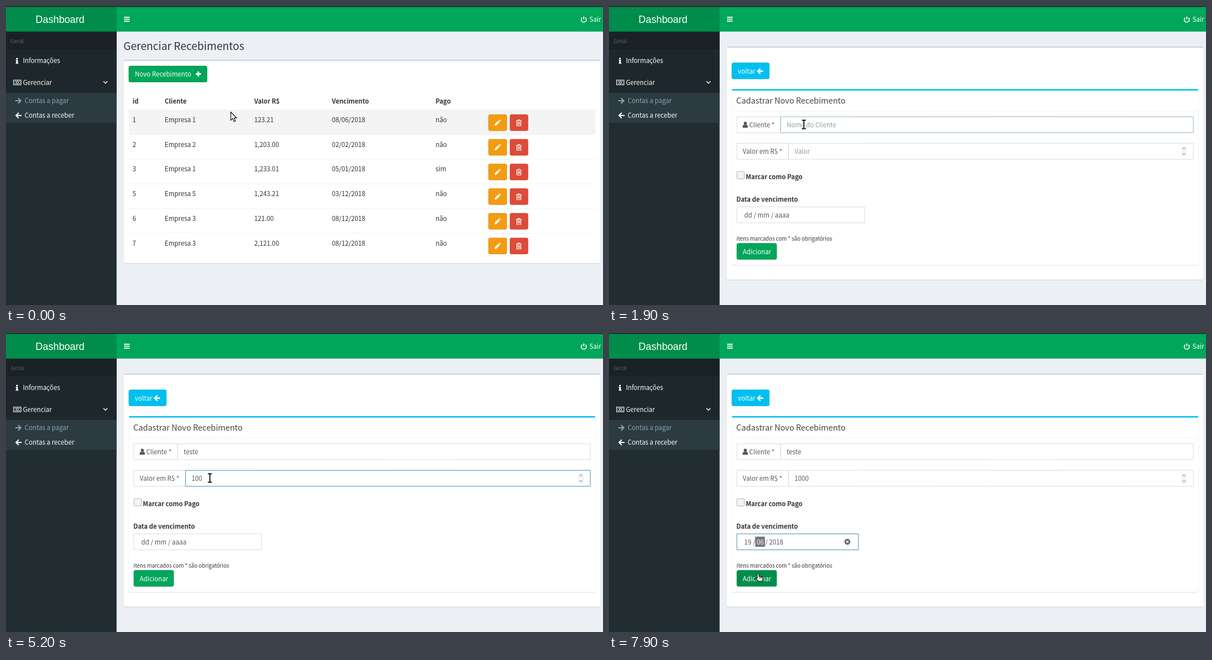
Animation, 1057 px wide and 530 px high, one loop 8 s. Source, as an HTML page with a canvas:

```html
<!DOCTYPE html>
<html lang="pt-BR">
<head>
<meta charset="utf-8">
<title>Dashboard</title>
<style>
html, body { margin: 0; width: 100%; height: 100%; overflow: hidden; background: #ecf0f5; }
canvas { display: block; }
</style>
</head>
<body>
<canvas id="stage" width="1057" height="530"></canvas>
<script>
const ctx = document.getElementById('stage').getContext('2d');
const LOOP = 8000, STEP = 100;
const PX = 6 / 7; // one page pixel on the scaled-down screen
const CONTROL = 34 * PX, SIDEBAR = 195.8, NAV_BOTTOM = 45.4;
const UI = '"Noto Sans CJK JP", "Noto Sans CJK SC", "Noto Sans CJK", sans-serif';
const SYSTEM = '"Noto Sans", sans-serif';
const GREEN = '#00a65a', DARK_GREEN = '#008d4c', CYAN = '#00c0ef', LINE = '#d2d6de', BLUE = '#3c8dbc';

const clamp = v => Math.max(0, Math.min(1, v));
const smooth = v => v * v * (3 - 2 * v);

function rect(x1, y1, x2, y2, color) {
  ctx.fillStyle = color;
  ctx.fillRect(x1, y1, x2 - x1, y2 - y1);
}

function frame(x1, y1, x2, y2, fill, border, radius = 0) {
  ctx.beginPath();
  ctx.roundRect(x1 + PX / 2, y1 + PX / 2, x2 - x1 - PX, y2 - y1 - PX, radius);
  if (fill) { ctx.fillStyle = fill; ctx.fill(); }
  ctx.lineWidth = PX;
  ctx.strokeStyle = border;
  ctx.stroke();
}

const button = (x1, y, x2, fill, border) => frame(x1, y, x2, y + CONTROL, fill, border, 2.5);

function text(str, x, y, color = '#333', size = 11.3, family = UI, weight = 400) {
  ctx.font = `${weight} ${size}px ${family}`;
  ctx.fillStyle = color;
  ctx.fillText(str, x, y);
}
const bold = (str, x, y) => text(str, x, y, '#333', 11.15, UI, 700);

function centered(str, x, y, ...style) {
  ctx.textAlign = 'center';
  text(str, x, y, ...style);
  ctx.textAlign = 'left';
}

function icon(d, x, y, { fill, stroke, width = 1, angle = 0, flip = 1 }) {
  const path = new Path2D(d);
  ctx.save();
  ctx.translate(x, y);
  ctx.rotate(angle);
  ctx.scale(flip, 1);
  if (fill) { ctx.fillStyle = fill; ctx.fill(path); }
  if (stroke) { ctx.strokeStyle = stroke; ctx.lineWidth = width; ctx.stroke(path); }
  ctx.restore();
}

const ARROW = 'M5.5 0H-4M.5-4.7L-4.2 0L.5 4.7';
const CHEVRON = 'M2-3.5L-1.5 0L2 3.5';
const PENCIL = 'M-5 5l.8-3.4 5.6-5.6 2.6 2.6-5.6 5.6zM2.2-4.8l1-1q.6-.4 1.1 0l1.5 1.5q.4.5 0 1.1l-1 1z';
const TRASH = 'M-5-3.5h10M-1.8-3.5v-1.7h3.6v1.7M-3.6-3.5v8.6h7.2v-8.6M-1.5-1.5v4.6M.2-1.5v4.6M1.8-1.5v4.6';
const USER = 'M-2.7-2.6a2.7 2.9 0 1 1 5.4 0a2.7 2.9 0 1 1-5.4 0zM-4.6 5.2q-.4-5 2.4-5.2q2.2 1.6 4.4 0q2.8.2 2.4 5.2z';
const POWER = 'M-2.7-3.3a4.5 4.5 0 1 0 5.4 0M0-5.5v5.3';
const POINTER = 'M0 0V14.5L3.4 11.4L5.7 16.8L8.2 15.7L5.9 10.5H10.4Z';
const HAND = 'M-1.5 1q1.5-2 3 0v4.5l6 1.2q1.5.5 1.2 2.3l-1 5h-7.5l-4.5-5.5q.5-1.8 2.8 0z';
const BEAM = 'M-3.5-7.5h2.5l1 1 1-1h2.5M-3.5 7.5h2.5l1-1 1 1h2.5M0-6.5v13';

// A raised panel with a coloured top edge.
function panel(x1, y1, x2, y2, edge) {
  ctx.save();
  ctx.shadowColor = 'rgba(0,0,0,.12)';
  ctx.shadowBlur = 1.5;
  ctx.shadowOffsetY = 1;
  ctx.fillStyle = '#fff';
  ctx.beginPath();
  ctx.roundRect(x1, y1, x2 - x1, y2 - y1, 2.5);
  ctx.fill();
  ctx.restore();
  rect(x1 + .7, y1, x2 - .7, y1 + 3 * PX, edge);
}

function drawShell(t, dx) {
  rect(0, 0, 1057, 530, '#ecf0f5');
  rect(0, 0, 1057, NAV_BOTTOM, GREEN);
  rect(0, 45, SIDEBAR, 530, '#222d32');
  rect(0, 45, SIDEBAR, 77, '#1a2226');
  rect(0, 77, SIDEBAR, 154, '#1e282c');
  rect(0, 154, SIDEBAR, 207, '#2c3b41');
  rect(0, 0, SIDEBAR, NAV_BOTTOM, DARK_GREEN);
  rect(0, 0, 1057, 1.7, '#222a2c');
  centered('Dashboard', 95.6, 30, '#fff', 17.7, '"Liberation Sans", Arial, sans-serif');
  for (const y of [19, 22.5, 26]) rect(209, y, 219, y + 1.8, '#fff');
  icon(POWER, 1023 + dx, 24, { stroke: '#fff', width: 1.6 });
  text('Sair', 1033 + dx, 28, '#fff');

  text('Geral', 8, 66, '#4b646f', 9.6);
  icon('M-1.5-5h3v2.4h-3zM-2.3-1.4h3.8v5h1v1.6h-4.8v-1.6h1v-3.4h-1z', 19.5, 97, { fill: '#fff' });
  text('Informações', 30, 101, '#fff');
  icon('M-6.5-4.3h13v8.6h-13zM-4.7-1.5q1.3-.3 1.5-1.5M4.7-1.5q-1.3-.3-1.5-1.5M-4.7 1.5q1.3.3 1.5 1.5M4.7 1.5q-1.3.3-1.5 1.5M-1.8 0a1.8 2.5 0 1 0 3.6 0a1.8 2.5 0 1 0-3.6 0',
    20, 135.5, { stroke: '#fff', width: 1.1 });
  text('Gerenciar', 30, 140, '#fff');
  const closed = t >= 1000 ? 1 - clamp((t - 1200) / 300) : 0;
  icon(CHEVRON, 176, 135.5, { stroke: '#fff', width: 1.3, angle: (closed - 1) * Math.PI / 2 });
  icon(ARROW, 22, 168, { stroke: '#8aa4af', width: 2, flip: -1 });
  text('Contas a pagar', 33, 172, '#8aa4af');
  icon(ARROW, 22, 194, { stroke: '#fff', width: 2 });
  text('Contas a receber', 33, 198, '#fff');
}

const COLUMNS = [224, 281, 439.5, 577, 760.5];
const ROWS = [
  ['1', 'Empresa 1', '123.21', '08/06/2018', 'não'],
  ['2', 'Empresa 2', '1,203.00', '02/02/2018', 'não'],
  ['3', 'Empresa 1', '1,233.01', '05/01/2018', 'sim'],
  ['5', 'Empresa 5', '1,243.21', '03/12/2018', 'não'],
  ['6', 'Empresa 3', '121.00', '08/12/2018', 'não'],
  ['7', 'Empresa 3', '2,121.00', '08/12/2018', 'não']
];

function drawList(mouse) {
  text('Gerenciar Recebimentos', 208, 78, '#333', 18.8);
  panel(208.5, 95, 1052.6, 456, LINE);
  button(217.2, 106, 356.3, mouse.y < 135 ? DARK_GREEN : GREEN, DARK_GREEN);
  text('Novo Recebimento', 228.3, 125, '#fff');
  rect(336, 119, 345, 122, '#fff');
  rect(339, 116, 342, 125, '#fff');

  ['id', 'Cliente', 'Valor R$', 'Vencimento', 'Pago'].forEach((name, i) => bold(name, COLUMNS[i], 173));
  ROWS.forEach((row, i) => {
    const y = i * 51 * PX, top = 184 + y, buttons = 192.2 + y;
    if (!i && mouse.y > 184) rect(217.2, 184, 1044, 228, '#f4f4f4');
    rect(217.2, top, 1044, top + PX, '#f0f0f0');
    row.forEach((cell, c) => text(cell, COLUMNS[c], Math.round(206 + y)));
    button(854, buttons, 887, '#f39c12', '#e08e0b');
    icon(PENCIL, 870, buttons + 15, { fill: '#fff' });
    button(892, buttons, 924.5, '#dd4b39', '#d73925');
    icon(TRASH, 908, buttons + 14.8, { stroke: '#fff', width: 1.1 });
  });
}

// Text present at time t, from [start, value] pairs in order.
const typed = (t, steps) => steps.reduce((value, [start, next]) => t >= start ? next : value, '');
const focus = (t, on, off) => clamp((t - on + 100) / 200) * clamp((off + 200 - t) / 200);

function field(x1, y, x2, glow) {
  frame(x1, y, x2, y + CONTROL, '#fff', LINE);
  ctx.globalAlpha = glow;
  frame(x1, y, x2, y + CONTROL, null, BLUE);
  ctx.globalAlpha = 1;
}

function drawForm(t, dx) {
  const right = 1034.9 + dx;
  panel(208.5, 71.5, 1052.6 + dx, 485, LINE);
  button(217.2, 100.4, 284.2, CYAN, '#00acd6');
  text('voltar', 228.3, 120, '#fff');
  icon(ARROW, 267.5, 115.5, { stroke: '#fff', width: 2.5 });
  panel(217.2, 147.3, 1043.7 + dx, 459, CYAN);
  text('Cadastrar Novo Recebimento', 225.3, 173, '#444', 14.25);
  rect(217.2, 186, 1043.7 + dx, 186 + PX, '#f4f4f4');

  const client = typed(t, [[2600, 't'], [2700, 'te'], [2900, 'tes'], [3000, 'test'], [3100, 'teste']]);
  field(226, 196, 304, 0);
  field(303.4, 196, right, focus(t, 1900, 3800));
  icon(USER, 241.3, 210.5, { fill: '#555' });
  text('Cliente *', 248.3, 215, '#555');
  text(client || 'Nome do Cliente', 314.5, 215, client ? '#555' : '#999');
  if (client && t < 3400) {
    const caret = Math.round(315 + ctx.measureText(client).width);
    rect(caret, 203, caret + 1, 218, '#333');
  }

  const value = typed(t, [[4600, '1'], [5100, '10'], [5200, '100'], [5400, '1000']]);
  field(226, 243, 318, 0);
  field(317.5, 243, right, focus(t, 4000, 6300));
  text('Valor em R$ *', 236.8, 262, '#555');
  text(value || 'Valor', 328.5, 262, value ? '#555' : '#999');
  rect(right - 22, 248, right - 12, 267, '#f5f5f5');
  for (const side of [-1, 1])
    icon('M-2.5 1.3L0-1.3L2.5 1.3', right - 17, 257.5 + side * 5, { stroke: '#666', angle: side > 0 ? Math.PI : 0 });

  frame(226, 293, 240, 307, '#f4f4f4', '#aaa', 2);
  bold('Marcar como Pago', 242.3, 307);
  bold('Data de vencimento', 225.5, 347);
  drawDate(t);
  text('itens marcados com * são obrigatórios', 225.8, 416, '#333', 9.5);
  button(226, 420.4, 297.2, t >= 7700 ? DARK_GREEN : GREEN, DARK_GREEN);
  text('Adicionar', 236.8, 440, '#fff');

  if (t >= 2600 && t < 3100) drawSuggestions(t < 2900 ? ['test2', 'teto'] : ['test2'], right);
  if (t >= 6500 && t < 7400) drawCalendar();
}

function drawDate(t) {
  const filled = t >= 7300, active = t >= 6300;
  field(226, 355.6, filled ? 442 : 452.8, focus(t, 6300, LOOP));
  const parts = filled
    ? [['19', 239.5], ['/', 255], ['06', 261.5], ['/', 276.5], ['2018', 283.5]]
    : [['dd', 239.5], ['/', 256], ['mm', 263], ['/', 286.8], ['aaaa', 293.8]];
  if (active) rect(filled ? 259 : 261, 361, filled ? 276 : 287, 379, '#777');
  parts.forEach(([str, x], i) => text(str, x, 375, active && i === 2 ? '#fff' : '#555'));
  if (filled) {
    icon('M-5.2 0a5.2 5.2 0 1 0 10.4 0a5.2 5.2 0 1 0-10.4 0', 422, 370, { fill: '#666' });
    icon('M-2-2L2 2M2-2L-2 2', 422, 370, { stroke: '#fff', width: 1.4 });
  }
}

function drawSuggestions(items, right) {
  const bottom = 225 + items.length * 20;
  ctx.save();
  ctx.shadowColor = 'rgba(0,0,0,.3)';
  ctx.shadowBlur = 4;
  ctx.shadowOffsetY = 1;
  rect(303.5, 225, right, bottom, '#f7f6f6');
  ctx.restore();
  frame(303.5, 225, right, bottom, '#f7f6f6', '#555');
  items.forEach((item, i) => text(item, 309.5, 240 + i * 20, '#333', 13.2, SYSTEM));
}

function drawCalendar() {
  const cell = 32;
  frame(226, 146, 453, 355, '#fff', '#b5b5b5');
  icon(CHEVRON, 242, 162, { stroke: '#555', width: 1.5 });
  icon(CHEVRON, 437, 162, { stroke: '#555', width: 1.5, flip: -1 });
  centered('junho 2018', 339.5, 166, '#333');
  ['dom', 'seg', 'ter', 'qua', 'qui', 'sex', 'sáb'].forEach((day, i) =>
    centered(day, 243.5 + i * cell, 190, '#888', 9));
  for (let i = 0; i < 42; i++) {
    const date = new Date(2018, 4, 27 + i);
    centered(String(date.getDate()), 243.5 + i % 7 * cell, 214 + Math.floor(i / 7) * 26,
      date.getMonth() === 5 ? '#333' : '#bbb', 10.5);
  }
}

function drawStatus(message, right, alpha) {
  ctx.globalAlpha = alpha;
  frame(-1, 512, right, 531, '#dcdcdc', '#888');
  text(message, -1, 526.5, '#444', 12.8, SYSTEM);
  ctx.globalAlpha = 1;
}

const ROUTE = [
  [0, 398, 188], [600, 267, 122], [800, 269, 125], [1100, 333, 235], [1800, 345, 210],
  [3000, 345, 209], [3500, 352, 280], [3900, 361, 247], [4200, 361, 257], [5300, 361, 257],
  [6200, 267, 377], [6500, 267, 377], [7100, 307, 290], [7300, 307, 290], [7900, 264, 426]
];

function mouseAt(t) {
  const i = Math.max(1, ROUTE.findIndex(stop => stop[0] >= t));
  const [t0, x0, y0] = ROUTE[i - 1], [t1, x1, y1] = ROUTE[i];
  const k = smooth((t - t0) / (t1 - t0));
  return { x: x0 + (x1 - x0) * k, y: y0 + (y1 - y0) * k };
}

function drawMouse(t, { x, y }) {
  const overButton = t < 1000 ? y < 135 : t >= 7700;
  const overText = t >= 1000 && t < 5600 && !(t >= 2600 && t < 3600);
  if (overText) {
    icon(BEAM, x, y, { stroke: '#fff', width: 3.6 });
    icon(BEAM, x, y, { stroke: '#111', width: 1.8 });
  } else {
    icon(overButton ? HAND : POINTER, x, y, { fill: '#fff', stroke: '#111', width: 1.2 });
    if (overButton) icon('M2.7 6.5v2.5M4.8 7v2M6.8 7.4v2', x, y, { stroke: '#111', width: .8 });
  }
}

function draw() {
  const t = Math.floor(performance.now() % LOOP / STEP) * STEP;
  const narrow = t >= 1000 && t < 1300, dx = narrow ? -11 : 0;
  const mouse = mouseAt(t);
  drawShell(t, dx);
  if (t < 1000) drawList(mouse); else drawForm(t, dx);
  if (narrow) {
    rect(1055, 2, 1057, 530, '#e8e8e8');
    rect(1056, 2, 1057, 476, '#aaa');
  }
  if (t >= 600 && t < 1000) drawStatus('localhost:8000/recebimentos/novo', 212, t < 700 ? .22 : 1);
  if (t >= 1000 && t < 1500) drawStatus('Leu cdnjs.cloudflare.com', 277, 1);
  drawMouse(t, mouse);
  requestAnimationFrame(draw);
}
draw();
</script>
</body>
</html>
```
